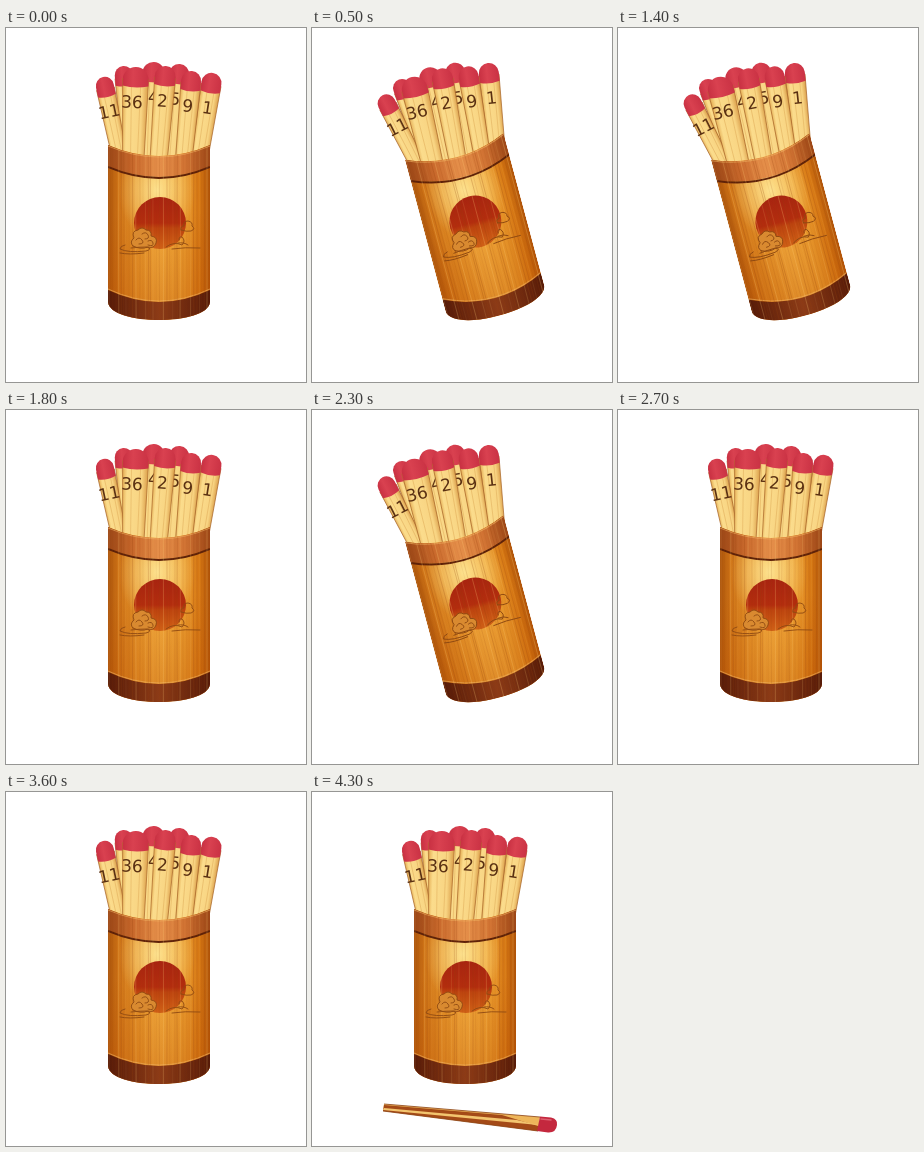
An HTML page that plays this animation: 300 by 354 pixels, repeating every 4.5 s.

```html
<!DOCTYPE html>
<html>
<head>
<meta charset="utf-8">
<style>
  html, body { margin: 0; width: 100%; height: 100%; overflow: hidden; background: #fff; }
  svg { display: block; width: 100vw; height: 100vh; }
  text { font: 17px "DejaVu Sans", sans-serif; fill: #5a3012; text-anchor: middle; }
</style>
</head>
<body>
<svg viewBox="0 0 300 354">
  <defs>
    <linearGradient id="wood">
      <stop offset="0" stop-color="#a9520a"/><stop offset=".1" stop-color="#cf7417"/>
      <stop offset=".3" stop-color="#e6952b"/><stop offset=".5" stop-color="#f3ac3e"/>
      <stop offset=".75" stop-color="#eb9c2e"/><stop offset=".9" stop-color="#d57613"/>
      <stop offset="1" stop-color="#ae5208"/>
    </linearGradient>
    <linearGradient id="shade" x2="0" y2="1">
      <stop offset=".4" stop-color="#b84e00" stop-opacity="0"/>
      <stop offset="1" stop-color="#b84e00" stop-opacity=".4"/>
    </linearGradient>
    <radialGradient id="glow">
      <stop offset="0" stop-color="#ffeb9c" stop-opacity=".85"/>
      <stop offset="1" stop-color="#ffeb9c" stop-opacity="0"/>
    </radialGradient>
    <linearGradient id="rim">
      <stop offset="0" stop-color="#9a4616"/><stop offset=".25" stop-color="#c9692c"/>
      <stop offset=".5" stop-color="#e58f4a"/><stop offset=".75" stop-color="#d27434"/>
      <stop offset="1" stop-color="#9c4616"/>
    </linearGradient>
    <linearGradient id="base">
      <stop offset="0" stop-color="#571b08"/><stop offset=".5" stop-color="#8c3b17"/>
      <stop offset="1" stop-color="#571b08"/>
    </linearGradient>
    <linearGradient id="shaft">
      <stop offset="0" stop-color="#e2aa50"/><stop offset=".2" stop-color="#fbdc8c"/>
      <stop offset=".75" stop-color="#f8d482"/><stop offset="1" stop-color="#d99c48"/>
    </linearGradient>
    <linearGradient id="head">
      <stop offset="0" stop-color="#c83042"/><stop offset=".4" stop-color="#d94150"/>
      <stop offset="1" stop-color="#ca3244"/>
    </linearGradient>
    <linearGradient id="sun" x2="0" y2="1">
      <stop offset="0" stop-color="#a82410"/><stop offset=".5" stop-color="#b32d0e"/>
      <stop offset=".6" stop-color="#bd440f"/><stop offset="1" stop-color="#cf6016"/>
    </linearGradient>
    <clipPath id="body"><path d="M102 117Q153 139 204 117V274C202 298 104 298 102 274Z"/></clipPath>
  </defs>

  <g id="cup">
    <g id="sticks"></g>
    <g clip-path="url(#body)">
      <path d="M102 110H204V295H102Z" fill="url(#wood)"/>
      <path d="M102 110H204V295H102Z" fill="url(#shade)"/>
      <ellipse cx="151" cy="162" rx="38" ry="52" fill="url(#glow)"/>
      <path d="M102 117Q153 139 204 117V138Q153 160 102 138Z" fill="url(#rim)"/>
      <path d="M102 262Q153 286 204 262V295H102Z" fill="url(#base)"/>
      <path d="M102 139Q153 161 204 139" fill="none" stroke="#5e2108" stroke-width="2"/>
      <path d="M102 118Q153 140 204 118M102 261Q153 285 204 261" fill="none" stroke="#f0b262" opacity=".6"/>
      <circle cx="154" cy="195" r="26" fill="url(#sun)"/>
      <g id="grain" fill="none"></g>
    </g>
    <g stroke="#8f4a12" stroke-width=".9" fill="none" stroke-linecap="round">
      <path fill="#d98a30" d="M127 218q-4-4 1-8q-3-7 4-8q4-4 8 0q6 0 5 6q7 1 5 7q-2 6-8 4q-7 3-15-1z"/>
      <path d="M130 212q3-4 6 0t-3 4M136 206q4-3 6 1t-3 4M142 213q4-2 5 2t-5 2"/>
      <path d="M119 217q-5 1-5 4q8 4 26 2q7-2 1-4q-8 0-16 1M114 225q9 2 24 0"/>
      <path d="M175 202q-1-4 3-4q-1-5 4-5q5 1 4 5q4 3-1 5q-4 1-10-1"/>
      <path d="M160 219q8-6 16-2q4-4 0-8q-3-1-3 3M166 221q13-2 28-1M172 215q6-1 10 2"/>
    </g>
  </g>

  <g id="fallen">
    <path d="M72 312L228 325 226 339 71 319Z" fill="#eeb65a"/>
    <path d="M72 313L190 323 226 334V339L71 319Z" fill="#a44a17"/>
    <path d="M72 316L205 328 226 333 71 318Z" fill="#f3c56f"/>
    <path d="M72 312L228 325M71 319L226 339" stroke="#8a4015" stroke-width=".8"/>
    <path d="M228 324.500L239 325.500Q246 327 245 333Q244 341 236 340.500L225 339Z" fill="#c4283e"/>
    <path d="M229 327L239 328" stroke="#dd6070" stroke-width="1.500" stroke-linecap="round"/>
  </g>
</svg>
<script>
const $ = id => document.getElementById(id);

// A match with its tip at (x, y) and its foot at (fx, fy)
function stick(x, y, fx, fy, width, label = "", labelX = 0) {
  const length = Math.hypot(fx - x, fy - y), r = width / 2, foot = r * 0.8;
  const angle = Math.atan2(x - fx, fy - y) * 180 / Math.PI;
  return `<g transform="translate(${x} ${y}) rotate(${angle})">
    <path d="M${-r} 12L${-foot} ${length}H${foot}L${r} 12Z" fill="url(#shaft)" stroke="#a9672a" stroke-width=".7"/>
    <path d="M${-r * 0.3} 20L${-r * 0.2} ${length}M${r * 0.4} 20L${r * 0.3} ${length}" stroke="#e3b260" stroke-width=".6"/>
    <path d="M${-r} 19V${r}A${r} ${r} 0 0 1 ${r} ${r}V19Q0 22 ${-r} 19Z" fill="url(#head)"/>
    <text x="${labelX}" y="41">${label}</text></g>`;
}

$("sticks").innerHTML = `<g id="flying">${stick(268, 62, 175, 155, 15)}</g>` + [
  [117, 38, 125, 135, 18],
  [148, 34, 143, 140, 22, "4", 1],
  [174, 36, 165, 140, 20, "5", -2],
  [97, 49, 116, 140, 18, "11", -1],
  [207, 45, 192, 140, 20, "1"],
  [186, 43, 177, 140, 20, "9", -1],
  [130, 39, 127, 140, 26, "36", -3],
  [160, 38, 152, 140, 21, "2", -1]
].map(s => stick(...s)).join("");

let grain = "";
for (let i = 0; i < 34; i++) {
  const x = 103 + i * 3 + Math.sin(i * 7);
  const color = i % 3 ? "#92410f" : "#ffd07a";
  grain += `<path d="M${x} 118q${Math.sin(i * 4)} 90 0 180" stroke="${color}"
    stroke-width=".9" opacity="${0.17 + 0.1 * Math.sin(i * 5)}"/>`;
}
$("grain").innerHTML = grain;

const show = (id, on) => $(id).style.display = on ? "" : "none";

function draw(now) {
  const t = now % 4500, beat = t % 900;
  let pose = "";
  if (t < 4100 && beat >= 500) {
    pose = beat < 700 ? "translate(12 -1.500) rotate(-15 153 205)"
                      : "translate(-11.500 -2.500) rotate(15 153 205)";
  }
  $("cup").setAttribute("transform", pose);
  show("flying", t >= 4100 && t < 4300);
  show("fallen", t >= 4300);
  requestAnimationFrame(draw);
}
draw(performance.now());
</script>
</body>
</html>
```
